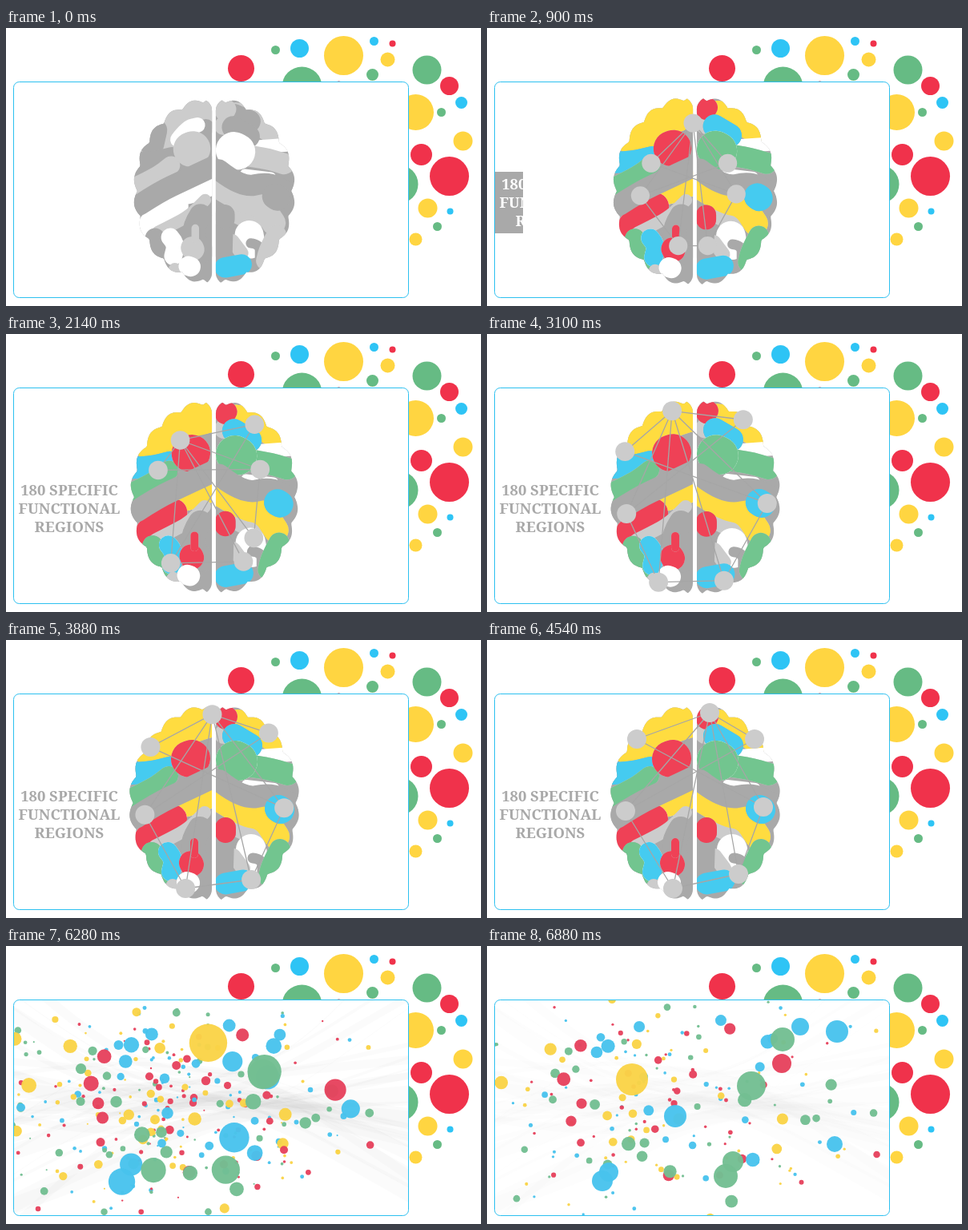
An HTML page with a canvas for the animation above (6.9 s loop, 593 px wide and 348 px high).

```html
<!DOCTYPE html>
<html lang="en">
<head>
<meta charset="utf-8">
<title>Brain regions</title>
<style>
  html, body { margin: 0; width: 100%; height: 100%; overflow: hidden; background: #fff; }
  canvas { display: block; }
</style>
</head>
<body>
<canvas id="stage" width="593" height="348"></canvas>
<script>
const ctx = document.getElementById('stage').getContext('2d');
const LOOP = 6900, CX = 260, CY = 205, TAU = Math.PI * 2;
const DARK = '#a9a9a9', LIGHT = '#cccccc', WHITE = '#ffffff';
const YELLOW = '#ffdc40', BLUE = '#45cbf0', RED = '#ef4156', GREEN = '#72c58f';

const clamp = v => Math.max(0, Math.min(1, v));
const ramp = (t, from, to) => clamp((t - from) / (to - from));
const ease = k => k * k * (3 - 2 * k);
const mix = (a, b, k) => a + (b - a) * k;

let seed = 11;
const random = () => (seed = seed * 16807 % 2147483647) / 2147483647;
const spread = range => (random() + random() - 1) * range;

function disc(x, y, r, color) {
  ctx.fillStyle = color;
  ctx.beginPath();
  ctx.arc(x, y, Math.max(0, r), 0, TAU);
  ctx.fill();
}

// Smooth open curve along x, y, x, y ...; one point makes a dot
function curve(p) {
  const path = new Path2D(), n = p.length;
  path.moveTo(p[0] - 0.01, p[1]);
  for (let i = 2; i < n - 2; i += 2)
    path.quadraticCurveTo(p[i], p[i + 1], (p[i] + p[i + 2]) / 2, (p[i + 1] + p[i + 3]) / 2);
  path.lineTo(p[n - 2], p[n - 1]);
  return path;
}

// Scalloped oval around the whole brain
const outline = new Path2D();
for (let a = 0; a < TAU; a += 0.02) {
  const r = 0.965 + 0.05 * Math.abs(Math.sin(11 * a));
  outline.lineTo(CX + 105 * r * Math.cos(a), 204 + 122 * r * Math.sin(a));
}

// Regions are thick strokes: colour before, colour after, width, points
const region = (before, after, width, ...points) => ({ before, after, width, path: curve(points) });
const halves = [
  { x: 150, regions: [
    region(LIGHT, YELLOW, 50, 250, 98, 215, 108, 183, 135),
    region(DARK, null, 32, 182, 124, 178, 142),
    region(DARK, null, 22, 249, 120),
    region(WHITE, null, 20, 212, 136, 224, 120, 238, 117),
    region(DARK, BLUE, 28, 158, 167, 180, 166, 204, 160),
    region(LIGHT, GREEN, 24, 158, 197, 185, 184, 203, 170),
    region(LIGHT, RED, 46, 229, 149, 232, 148),
    region(WHITE, YELLOW, 28, 215, 209, 236, 206, 262, 192),
    region(WHITE, RED, 36, 178, 249, 190, 234, 208, 224),
    region(LIGHT, LIGHT, 16, 186, 258, 206, 248, 228, 236, 248, 216),
    region(DARK, DARK, 28, 162, 222, 188, 205, 220, 190, 258, 172),
    region(DARK, DARK, 30, 242, 236, 228, 258, 244, 284),
    region(DARK, GREEN, 26, 182, 266, 192, 294),
    region(WHITE, BLUE, 24, 202, 265, 210, 274, 206, 290),
    region(LIGHT, RED, 30, 231, 279, 232, 281),
    region(LIGHT, RED, 10, 235, 253, 235, 268),
    region(LIGHT, LIGHT, 16, 208, 307),
    region(WHITE, WHITE, 26, 226, 303, 229, 304)
  ] },
  { x: 262, regions: [
    region(LIGHT, YELLOW, 36, 288, 105, 312, 107, 336, 123),
    region(DARK, null, 30, 286, 104, 306, 112),
    region(WHITE, WHITE, 18, 316, 146, 370, 142),
    region(LIGHT, LIGHT, 24, 272, 118),
    region(LIGHT, RED, 26, 276, 96, 274, 99),
    region(DARK, BLUE, 30, 285, 120, 305, 132),
    region(WHITE, WHITE, 12, 300, 181, 335, 185),
    region(LIGHT, GREEN, 28, 300, 157, 325, 160, 352, 168),
    region(WHITE, GREEN, 48, 286, 150, 290, 152),
    region(LIGHT, LIGHT, 24, 284, 232, 312, 246),
    region(WHITE, WHITE, 38, 306, 262, 308, 274),
    region(DARK, DARK, 13, 308, 273, 320, 274, 320, 292),
    region(LIGHT, LIGHT, 18, 284, 270, 296, 286),
    region(LIGHT, YELLOW, 32, 268, 200, 296, 218, 322, 222, 338, 246),
    region(DARK, DARK, 28, 266, 176, 296, 200, 330, 192, 354, 204),
    region(DARK, BLUE, 34, 340, 211, 343, 213),
    region(DARK, DARK, 24, 273, 250, 272, 285),
    region(DARK, RED, 26, 274, 235, 274, 241),
    region(LIGHT, GREEN, 26, 342, 262, 332, 280, 328, 296),
    region(BLUE, BLUE, 27, 274, 305, 296, 301)
  ] }
];

function drawHalf({ x, regions }, t) {
  ctx.save();
  const side = new Path2D();
  side.roundRect(x, 82, 107, 246, 16);
  ctx.clip(side);
  ctx.clip(outline);
  ctx.fillStyle = DARK;
  ctx.fillRect(150, 70, 220, 270);
  ctx.lineCap = ctx.lineJoin = 'round';
  regions.forEach(({ before, after, width, path }, i) => {
    const start = 30 + (i * 7 % regions.length) / regions.length * 500;
    const k = ramp(t, start, start + 140);
    const paint = (color, alpha) => {
      ctx.globalAlpha = alpha;
      ctx.strokeStyle = color;
      ctx.lineWidth = width;
      ctx.stroke(path);
    };
    paint(before, after ? 1 : 1 - k);
    if (after && after !== before) paint(after, k);
  });
  ctx.restore();
}

function drawBrain(t) {
  const zoom = ramp(t, 4950, 5400);
  const scale = (1 - 0.052 * Math.pow(1 - ramp(t, 0, 3600), 1.5)) * (1 + 3 * zoom * zoom);
  ctx.save();
  ctx.translate(CX, CY);
  ctx.scale(scale, scale);
  ctx.translate(-CX, -CY);
  for (const half of halves) drawHalf(half, t);
  drawNetwork(t);
  ctx.restore();
  ctx.fillStyle = `rgba(255, 255, 255, ${zoom})`;
  ctx.fillRect(0, 0, 593, 348);
}

// Each node: positions at the key times
const keyTimes = [900, 2140, 3100, 4540];
const nodes = [
  [[257, 116], [217, 132], [231, 96], [278, 91]],
  [[302, 168], [311, 112], [320, 107], [334, 124]],
  [[203, 168], [189, 170], [172, 147], [187, 124]],
  [[313, 208], [318, 169], [350, 212], [345, 209]],
  [[189, 210], [205, 288], [174, 225], [173, 214]],
  [[276, 275], [310, 256], [296, 309], [314, 293]],
  [[238, 275], [297, 286], [214, 311], [232, 311]]
];
const links = ['01', '02', '03', '04', '05', '06', '23', '14', '46', '65', '35'];

function drawNetwork(t) {
  const grow = ease(ramp(t, 600, 850));
  if (!grow) return;
  let i = 0;
  while (i < 2 && t > keyTimes[i + 1]) i++;
  const k = ease(ramp(t, keyTimes[i], keyTimes[i + 1]));
  const at = nodes.map(n => [CX, CY].map((c, axis) =>
    mix(c, mix(n[i][axis], n[i + 1][axis], k), grow)));
  ctx.strokeStyle = '#a6a6a6';
  ctx.lineWidth = 1.3;
  ctx.beginPath();
  for (const [a, b] of links) {
    ctx.moveTo(...at[a]);
    ctx.lineTo(...at[b]);
  }
  ctx.stroke();
  for (const [x, y] of at) disc(x, y, 12 * grow, LIGHT);
}

// A grey box sweeps in over white text, then leaves grey text behind
function drawLabel(t) {
  const right = mix(9, 150, Math.pow(ramp(t, 740, 1200), 1.3));
  const left = mix(9, 150, ease(ramp(t, 1220, 1500)));
  const write = (color, x0, x1, back) => {
    ctx.save();
    ctx.beginPath();
    ctx.rect(x0, 180, x1 - x0, 77);
    ctx.clip();
    if (back) {
      ctx.fillStyle = back;
      ctx.fillRect(x0, 180, x1 - x0, 77);
    }
    ctx.fillStyle = color;
    ctx.font = 'bold 18.5px "Noto Serif", serif';
    ctx.textAlign = 'center';
    ['180 SPECIFIC', 'FUNCTIONAL', 'REGIONS'].forEach((s, i) => ctx.fillText(s, 79, 202 + i * 23));
    ctx.restore();
  };
  ctx.globalAlpha = 1 - ramp(t, 4950, 5250);
  write(DARK, 9, left);
  write(WHITE, left, right, DARK);
  ctx.globalAlpha = 1;
}

const hues = { y: '#fad447', r: '#e6425d', b: '#48c3ee', g: '#73bf92' };
const palette = Object.values(hues);

// The largest flying dots: [x, y, r] at the burst and at the end
const particles = [
  ['y', [317, 80, 27], [181, 167, 20]],
  ['g', [316, 141, 24], [330, 175, 18]],
  ['b', [330, 264, 23], [235, 213, 14]],
  ['g', [277, 200, 22], [369, 117, 15]],
  ['g', [253, 273, 20], [298, 288, 15]],
  ['b', [145, 296, 20], [144, 294, 13]],
  ['g', [73, 290, 18], [307, 270, 13]],
  ['b', [160, 265, 16], [152, 283, 12]],
  ['b', [227, 216, 16], [437, 107, 14]],
  ['r', [450, 210, 15], [368, 147, 12]],
  ['b', [185, 184, 14], [391, 101, 11]],
  ['b', [427, 164, 13], [434, 248, 10]]
].map(([hue, from, to]) => ({ color: hues[hue], from, to }));

// The crowd thins out and drifts away from the centre
for (let i = 0; i < 330; i++) {
  const x = 200 + spread(230), y = 208 + spread(160);
  const r = 2 + 9 * random() ** 3;
  const away = 0.12 + 0.2 * random();
  particles.push({
    color: palette[i % 4],
    from: [x, y, r],
    to: [x + (x - 190) * away + spread(30), y + (y - 205) * away + spread(30), i % 3 ? r * 0.8 : 0]
  });
}
particles.sort((a, b) => a.from[2] - b.from[2]);

// Faint fibres crossing behind the dots
const fibres = Array.from({ length: 26 }, () => {
  const y = 190 + spread(110), slope = spread(170);
  return {
    width: 1 + 22 * random() ** 2,
    path: curve([0, y + slope, 150, y + spread(50), 300, 185 + spread(50), 510, y - slope])
  };
});

function drawBurst(t) {
  const open = 1 - (1 - ramp(t, 4960, 5740)) ** 2;
  if (!open) return;
  const k = ramp(t, 5740, 6880);
  ctx.globalAlpha = open * mix(0.022, 0.006, k);
  ctx.strokeStyle = '#000';
  for (const { width, path } of fibres) {
    ctx.lineWidth = width;
    ctx.stroke(path);
  }
  ctx.globalAlpha = 0.96;
  for (const { color, from, to } of particles) {
    const [x, y, r] = from.map((v, i) => mix(v, to[i], k));
    disc(mix(CX, x, open), mix(CY, y, open), r * open, color);
  }
  ctx.globalAlpha = 1;
}

const confetti = {
  '#f0324b': [[293, 50, 16.5], [482, 19, 4], [415, 72, 6], [553, 72, 11.5], [518, 158, 13.5], [553, 185, 24.5]],
  '#66bb84': [[336, 27, 5.5], [369, 73, 25], [457, 58, 7.5], [525, 52, 18], [543, 105, 5.5], [490, 195, 24], [538, 248, 5.5]],
  '#2ec4f5': [[366, 25, 11.5], [459, 16, 5.5], [568, 93, 7.5], [554, 229, 4]],
  '#ffd541': [[421, 34, 24.5], [476, 39, 9], [511, 105, 22.5], [570, 141, 12], [526, 225, 12], [511, 264, 8]]
};

const card = new Path2D();
card.roundRect(9.5, 67.5, 493, 270, 7);

function frame() {
  const t = performance.now() % LOOP;
  ctx.fillStyle = WHITE;
  ctx.fillRect(0, 0, 593, 348);
  for (const color in confetti)
    for (const [x, y, r] of confetti[color]) disc(x + 0.5, y + 0.5, r, color);
  ctx.fillStyle = WHITE;
  ctx.fill(card);
  ctx.save();
  ctx.clip(card);
  if (t < 5400) {
    drawBrain(t);
    drawLabel(t);
  }
  drawBurst(t);
  ctx.restore();
  ctx.strokeStyle = '#2cc0f0';
  ctx.lineWidth = 1;
  ctx.stroke(card);
  requestAnimationFrame(frame);
}
frame();
</script>
</body>
</html>
```
